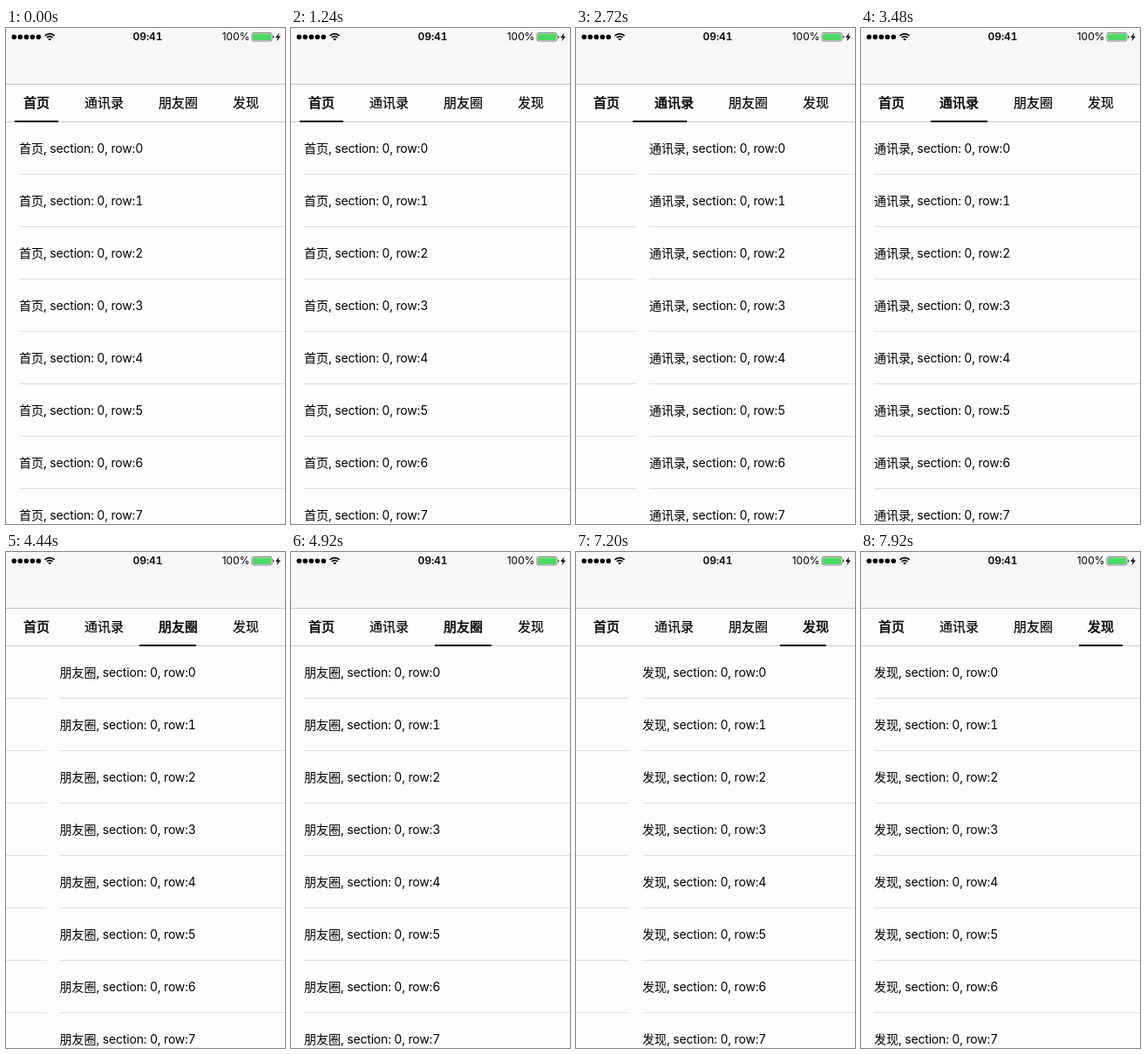
An HTML page for the animation above (8000 ms loop, 320 by 568 pixels).

```html
<!DOCTYPE html>
<html lang="zh-CN">
<head>
<meta charset="utf-8">
<title>Paged tabs</title>
<style>
  html, body { margin: 0; width: 100%; height: 100%; overflow: hidden; }
  body {
    position: relative;
    background: #fdfdfd;
    color: #000;
    font-family: Inter, "Noto Sans CJK SC", sans-serif;
    font-variant-numeric: tabular-nums;
  }

  .nav {
    position: absolute; left: 0; top: 0; width: 320px; height: 64px;
    background: #f8f6f7; border-bottom: 1px solid #c3c2c4;
  }
  .nav svg { display: block; }
  .charge { font-variant-numeric: normal; }

  .tabs {
    --medium: .2px; --bold: .55px;
    position: absolute; left: 0; top: 65px; width: 320px; height: 42px;
    background: #fdfdfd; border-bottom: 1px solid #cbcacc;
  }
  .tab {
    position: absolute; top: 0; font-size: 15px; line-height: 42px; white-space: nowrap;
    -webkit-text-stroke: var(--medium) #000;
  }
  .tab:nth-child(1) { left: 20px; -webkit-text-stroke-width: var(--bold); }
  .tab:nth-child(2) { left: 90px; animation: bold1 8s step-end infinite; }
  .tab:nth-child(3) { left: 175px; animation: bold2 8s step-end infinite; }
  .tab:nth-child(4) { left: 260px; animation: bold3 8s step-end infinite; }

  .bar, .track { animation: 8s cubic-bezier(.58, 0, .19, 1) infinite; }
  .bar { position: absolute; top: 41px; height: 2px; background: #000; z-index: 1; animation-name: bar; }

  .view { position: absolute; left: 0; top: 108px; width: 320px; height: 460px; overflow: hidden; }
  .track { display: flex; width: 1280px; animation-name: swipe; }
  .page { width: 320px; }
  .row {
    position: relative; height: 60px; padding-left: 15px;
    font-size: 14px; line-height: 60px; white-space: nowrap;
  }
  .row span { letter-spacing: -.17px; }
  .row::after {
    content: ""; position: absolute; left: 15px; right: 0; bottom: 0;
    height: 1px; background: #e0dfe1;
  }

  @keyframes swipe {
    0%, 26.5% { transform: translateX(0); }
    40.5%, 47.2% { transform: translateX(-320px); }
    61.2%, 82.25% { transform: translateX(-640px); }
    96.25%, 100% { transform: translateX(-960px); }
  }
  @keyframes bar {
    0%, 26.5% { left: 10px; width: 50px; }
    40.5%, 47.2% { left: 80px; width: 65px; }
    61.2%, 82.25% { left: 165px; width: 65px; }
    96.25%, 100% { left: 250px; width: 50px; }
  }
  @keyframes bold1 {
    0%, 53.1%, 100% { -webkit-text-stroke-width: var(--medium); }
    32.4% { -webkit-text-stroke-width: var(--bold); }
  }
  @keyframes bold2 {
    0%, 88.1%, 100% { -webkit-text-stroke-width: var(--medium); }
    53.1% { -webkit-text-stroke-width: var(--bold); }
  }
  @keyframes bold3 {
    0% { -webkit-text-stroke-width: var(--medium); }
    88.1%, 100% { -webkit-text-stroke-width: var(--bold); }
  }
</style>
</head>
<body>
  <div class="nav">
    <svg width="320" height="20" font-size="12">
      <path d="M9.3 10.2H38" stroke="#000" stroke-width="5.6" stroke-linecap="round" stroke-dasharray="0 7"/>
      <path d="M44.6 8.9a7.8 7.8 0 0 1 11 0M46.7 11a4.8 4.8 0 0 1 6.8 0" fill="none" stroke="#000" stroke-width="1.7"/>
      <path d="M50.1 14.6l-1.9-1.9a2.7 2.7 0 0 1 3.8 0z"/>
      <text x="162.5" y="14.4" text-anchor="middle" font-weight="600" letter-spacing="-.1">09:41</text>
      <text class="charge" x="279.5" y="14.4" text-anchor="end">100%</text>
      <rect x="282" y="5.5" width="23" height="9.5" rx="2" fill="none" stroke="#555" stroke-width=".7"/>
      <rect x="283" y="6.5" width="21" height="7.5" rx="1" fill="#4cd964"/>
      <path d="M306 8.6q1.5 .3 1.5 1.7t-1.5 1.7z" fill="#555"/>
      <path d="M313.4 5.6l-4.3 5.4h2.6l-1.2 4.2 4.5-5.6h-2.7z"/>
    </svg>
  </div>
  <div class="tabs"></div>
  <div class="view"><div class="track"></div></div>
<script>
  const names = ["首页", "通讯录", "朋友圈", "发现"];
  const row = (name, i) => `<div class="row">${name}<span>, section: 0, row:${i}</span></div>`;
  const page = name => `<div class="page">${Array.from({ length: 8 }, (_, i) => row(name, i)).join("")}</div>`;

  document.querySelector(".tabs").innerHTML =
    names.map(name => `<div class="tab">${name}</div>`).join("") + '<div class="bar"></div>';
  document.querySelector(".track").innerHTML = names.map(page).join("");
</script>
</body>
</html>
```
